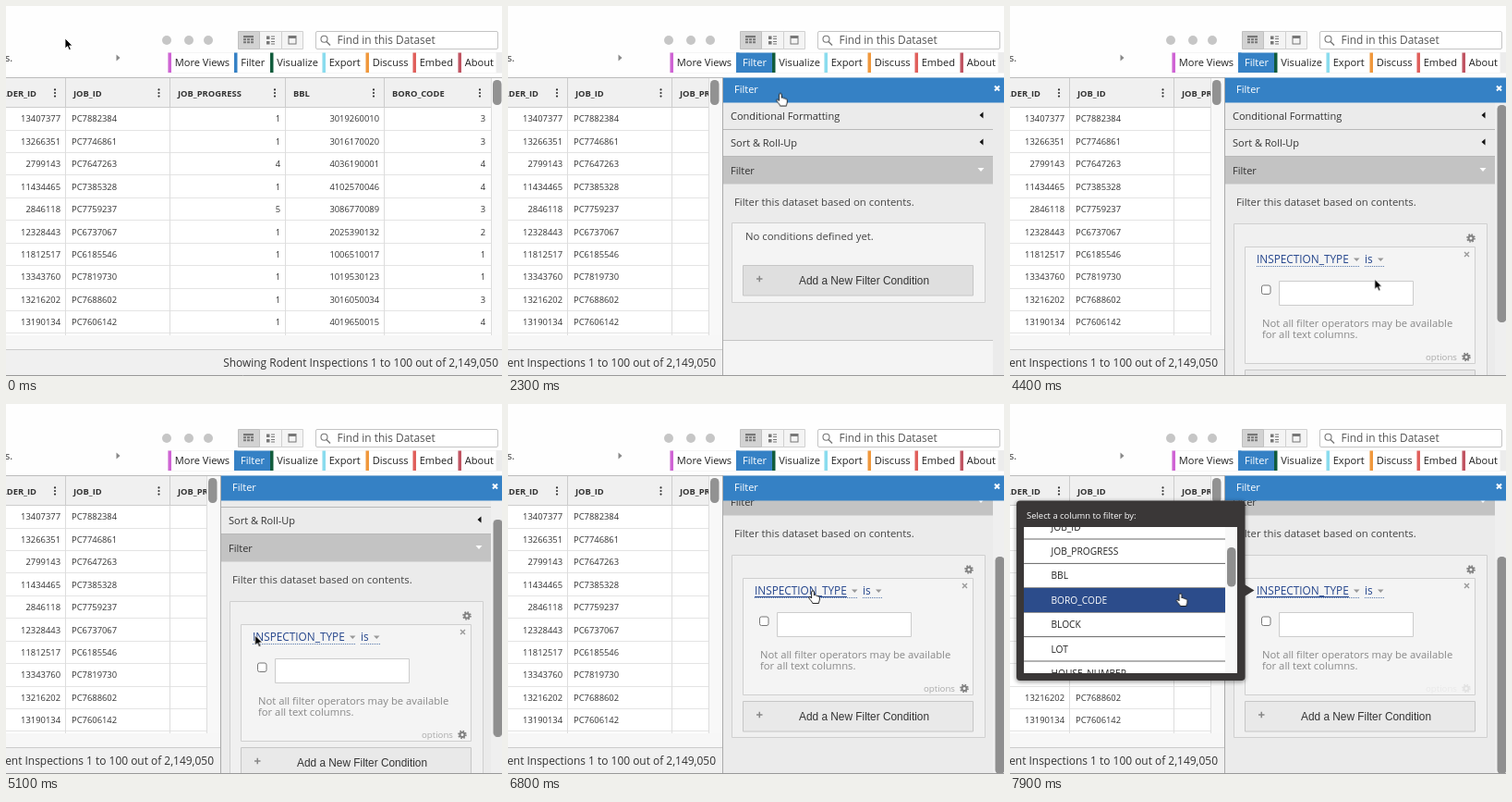
An HTML page for the animation above (8000 ms loop, 537 by 400 pixels).

```html
<!DOCTYPE html>
<html lang="en">
<head>
<meta charset="utf-8">
<title>Filtering a dataset</title>
<style>
html, body { margin: 0; width: 100%; height: 100%; overflow: hidden; background: #fff; }
svg { display: block; width: 537px; height: 400px; }
text { font: 11px "Open Sans", sans-serif; fill: #333; white-space: pre; }
.nav text { font-size: 11.1px; fill: #222; }
.cell { font-size: 9.4px; }
.head { font-size: 9.4px; font-weight: 700; }
.foot { font-size: 11.95px; }
.find { font-size: 11.9px; fill: #555; }
.note { font-size: 11.25px; fill: #888; }
.small { font-size: 9.66px; fill: #aaa; }
.body { font-size: 11.35px; fill: #444; }
.link { font-size: 11.8px; fill: #24458c; }
.btn { font: 11.86px "Liberation Sans", Arial, sans-serif; }
.item { font-size: 10.2px; fill: #222; }
.title { font-size: 9.44px; }
.end { text-anchor: end; }
text.white, .nav .white { fill: #fff; }

/* one percent of the loop is 80 ms */
.a { animation: 8s linear infinite; }
.hard { animation: 8s step-end infinite; }
#cursor { animation-name: move; }
#arrow { animation-name: arrow; }
#hand { animation-name: hand; }
#shift { animation-name: shift; }
#active { animation-name: active; }
#pane { animation-name: pane; }
#cover { animation-name: cover; }
#tip { animation-name: tip; }
.empty { animation-name: empty; }
.cond { animation-name: cond; }
#scroll { animation-name: scroll; }
#thumb { animation-name: thumb; }
#options { animation-name: options; }
#hover { animation-name: hover; }
#popup { animation-name: popup; }
#list { animation-name: list; }
#listThumb { animation-name: listThumb; }
#h3 { animation-name: h3; }
#h4 { animation-name: h4; }
#h5 { animation-name: h5; }

@keyframes move {
  0%, 1.25% { transform: translate(64px, 35px); }
  6.25% { transform: translate(400px, 57px); }
  8.75% { transform: translate(330px, 58px); }
  11.25%, 26.9% { transform: translate(268.5px, 60.5px); }
  31.25% { transform: translate(330px, 140px); }
  33.75% { transform: translate(383px, 280px); }
  35% { transform: translate(389px, 293px); }
  37.5%, 46.9% { transform: translate(390px, 295px); }
  50%, 55% { transform: translate(395px, 296px); }
  59.4% { transform: translate(320px, 66px); }
  63.75% { transform: translate(269px, 250px); }
  67.5%, 81.25% { transform: translate(436px, 239.5px); }
  85%, 87% { transform: translate(330px, 202px); }
  91.25% { transform: translate(199.5px, 206.5px); }
  93.75%, 100% { transform: translate(184.5px, 205px); }
}
@keyframes arrow { 0% { opacity: 1; } 4.75% { opacity: 0; } 47.5% { opacity: 1; } 83.75% { opacity: 0; } 87.5% { opacity: 1; } 93%, 100% { opacity: 0; } }
@keyframes hand { 0% { opacity: 0; } 4.75% { opacity: 1; } 47.5% { opacity: 0; } 83.75% { opacity: 1; } 87.5% { opacity: 0; } 93%, 100% { opacity: 1; } }
@keyframes active { 0% { opacity: 0; } 11.25%, 100% { opacity: 1; } }
@keyframes pane { 0% { opacity: 0; } 13.75%, 100% { opacity: 1; } }
@keyframes shift { 0% { transform: none; } 13.75%, 100% { transform: translateX(-308px); } }
@keyframes cover {
  0%, 17.6% { transform: none; animation-timing-function: ease-in-out; }
  23.6%, 47.49% { transform: translateY(169px); }
  47.5%, 100% { transform: translateY(281px); }
}
@keyframes tip { 0%, 30% { opacity: 0; } 32.5% { opacity: .4; } 35% { opacity: .1; } 36.25%, 100% { opacity: 0; } }
@keyframes empty { 0% { opacity: 1; } 47.5%, 100% { opacity: 0; } }
@keyframes cond { 0% { opacity: 0; } 47.5%, 100% { opacity: 1; } }
@keyframes scroll {
  0%, 57.5% { transform: none; }
  63.5%, 70% { transform: translateY(-22px); }
  74%, 100% { transform: translateY(-72px); }
}
@keyframes thumb {
  0%, 57.5% { transform: none; }
  63.5%, 70% { transform: translateY(17.7px); }
  74%, 100% { transform: translateY(58px); }
}
@keyframes options { 0%, 87.5% { opacity: 1; } 91.25% { opacity: .45; } 93.75%, 100% { opacity: .15; } }
@keyframes hover { 0% { opacity: 0; } 84%, 100% { opacity: 1; } }
@keyframes popup { 0%, 87.5% { opacity: 0; } 89.4%, 100% { opacity: 1; } }
@keyframes list { 0%, 95.5% { transform: none; } 98.5%, 100% { transform: translateY(-66px); } }
@keyframes listThumb { 0%, 95.5% { transform: none; } 98.5%, 100% { transform: translateY(19px); } }
@keyframes h3 { 0% { opacity: 1; } 97%, 100% { opacity: 0; } }
@keyframes h4 { 0% { opacity: 0; } 97% { opacity: 1; } 98.2%, 100% { opacity: 0; } }
@keyframes h5 { 0% { opacity: 0; } 98.2%, 100% { opacity: 1; } }
</style>
</head>
<body>
<svg viewBox="0 0 537 400">
  <defs>
    <g id="gear" fill="none" stroke="#808080">
      <circle r="2.5" stroke-width="2"/>
      <circle r="4" stroke-width="1.6" stroke-dasharray="1.6 1.54"/>
    </g>
    <g id="dots" fill="#333"><circle cy="-3.6" r="1.1"/><circle r="1.1"/><circle cy="3.6" r="1.1"/></g>
    <path id="x" d="M-2.5-2.5 2.5 2.5M2.5-2.5-2.5 2.5"/>
    <clipPath id="paneClip"><path d="M233 104H537V399H233Z"/></clipPath>
    <clipPath id="listClip"><path d="M15 133H246V291H15Z"/></clipPath>
    <filter id="soft"><feGaussianBlur stdDeviation="2"/></filter>
  </defs>

  <path fill="#fefefe" d="M0 0H537V77H0Z"/>

  <!-- top bar -->
  <text x="-1" y="60">s.</text>
  <path fill="#888" d="M119.5 52.5v7l4-3.5z"/>
  <g fill="#c6c6c6"><circle cx="174" cy="37" r="5"/><circle cx="198" cy="37" r="5"/><circle cx="219" cy="37" r="5"/></g>
  <g stroke="#d0d0d0">
    <path fill="#f4f4f4" d="M274.5 27.5h24v19h-24zM298.5 27.5h23v19h-23z"/>
    <path fill="#d2d2d2" stroke="#c0c0c0" d="M251.5 27.5h23v19h-23z"/>
    <rect x="335.5" y="27.5" width="197" height="19" rx="1.5" fill="#fff" stroke="#c4c4c4"/>
  </g>
  <g fill="#777">
    <path d="M257 32h11v2.2h-11zM257 35.3h3v2h-3zM261 35.3h3v2h-3zM265 35.3h3v2h-3zM257 38.3h3v2h-3zM261 38.3h3v2h-3zM265 38.3h3v2h-3z"/>
    <path d="M282 32.5h3.5v3.5h-3.5zM282 38h3.5v3.5h-3.5zM287 32.5h4v1h-4zM287 35h4v1h-4zM287 38h4v1h-4zM287 40.5h4v1h-4z"/>
    <path d="M305.5 32h9v9.5h-9zM306.5 35v5.5h7v-5.5z" fill-rule="evenodd"/>
  </g>
  <g fill="none" stroke="#777" stroke-width="1.1"><circle cx="344.5" cy="35.8" r="3.5"/><path d="M347 38.5l4 4" stroke-width="1.5"/></g>
  <text class="find" x="358.5" y="41">Find in this Dataset</text>
  <path fill="#ececec" d="M175 50H537V72.5H175Z"/>
  <g class="nav" id="nav"></g>
  <g id="active" class="nav hard">
    <path fill="#3581c5" d="M247 50.5h39v21.5h-39z"/>
    <text class="white" x="254" y="65">Filter</text>
  </g>

  <!-- table -->
  <path fill="#fff" d="M0 77H537V356H0Z"/>
  <path fill="#f0f0f0" d="M0 77H525V109H0Z"/>
  <path stroke="#bbb" d="M0 77.5H537"/>
  <path stroke="#ccc" d="M0 109.5H525"/>
  <g id="rows"></g>
  <path fill="#f7f7f7" d="M0 356H537V371H0Z"/>
  <path fill="#f0f0f0" d="M0 371H537V400H0Z"/>
  <path stroke="#ccc" d="M0 371.5H537"/>
  <g id="shift" class="hard">
    <path fill="#f8f8f8" d="M525 78h17v278h-17z"/>
    <path stroke="#ddd" d="M525.5 78V356"/>
    <rect x="527" y="80" width="9.5" height="27" rx="4.5" fill="#929292"/>
    <text class="foot end" x="533" y="389.5">Showing Rodent Inspections 1 to 100 out of 2,149,050</text>
  </g>
  <path stroke="#999" d="M0 399.5H537"/>

  <!-- hint bubble -->
  <g id="tip" class="a">
    <path fill="#fff" stroke="#999" d="M77 131h142v40l13 7-13 7v10H77z"/>
    <text class="cell" x="84" y="177">Filter this dataset based on</text>
    <text class="cell" x="84" y="187">contents.</text>
  </g>

  <!-- side pane -->
  <g id="pane" class="hard">
    <path fill="#ebebeb" d="M233 77H537V400H233Z"/>
    <g clip-path="url(#paneClip)">
      <g id="scroll" class="a">
        <path stroke="#b8b8b8" d="M233 133.5H525M233 162.5H525"/>
        <path fill="#c3c3c3" d="M233 163H525V192.5H233Z"/>
        <text x="241" y="123">Conditional Formatting</text>
        <text x="241" y="152">Sort &amp; Roll-Up</text>
        <text x="241" y="181.5">Filter</text>
        <path fill="#111" d="M514.5 114.5v7l-4-3.5zM514.5 143.5v7l-4-3.5z"/>
        <path fill="#fff" d="M508.5 175h7l-3.5 4z"/>
        <text class="body" x="245" y="215.6">Filter this dataset based on contents.</text>

        <g class="empty hard">
          <path fill="#f4f4f4" stroke="#cfcfcf" d="M242.5 234.5h274v86h-274z"/>
          <text class="body" x="257" y="252.8">No conditions defined yet.</text>
          <g class="add" fill="#dfdfdf"></g>
        </g>

        <g class="cond hard">
          <path fill="#f0f0f0" stroke="#cfcfcf" d="M242.5 235.5h274v197h-274z"/>
          <use href="#gear" x="499" y="251"/>
          <path fill="#f4f4f4" stroke="#cfcfcf" d="M254.5 260.5h249v126h-249z"/>
          <use href="#x" x="494.5" y="268.5" stroke="#999" stroke-width="1.4"/>
          <text class="link" x="267" y="277.7">INSPECTION_TYPE</text>
          <text class="link" x="384" y="277.7">is</text>
          <path stroke="#5577aa" stroke-dasharray="1 1" d="M267 281.5h112M384 281.5h21"/>
          <path id="hover" class="hard" stroke="#24458c" d="M267 280.5h100"/>
          <path fill="#999" d="M372 272.5h6.5l-3.25 3.5zM398 272.5h6.5l-3.25 3.5z"/>
          <rect x="272.5" y="302" width="9.5" height="9.5" rx="2" fill="#fff" stroke="#777"/>
          <path fill="#fff" stroke="#ccc" d="M291.5 297.5h145v26h-145z"/>
          <text class="note" x="273" y="346.8">Not all filter operators may be available</text>
          <text class="note" x="273" y="358.8">for all text columns.</text>
          <g id="options" class="a">
            <text class="small" x="450" y="383">options</text>
            <use href="#gear" x="494" y="379.5"/>
          </g>
          <g class="add" fill="#e9e9e9" transform="translate(0 113)"></g>
        </g>

        <g id="cover" class="a">
          <path fill="#f4f4f4" d="M233 192.5h292v220h-292z"/>
          <path stroke="#c4c4c4" d="M233 192.5h292"/>
        </g>
      </g>
      <g class="cond hard">
        <path fill="#efefef" d="M525 104h12v296h-12z"/>
        <rect id="thumb" class="a" x="527.5" y="107" width="10" height="235" rx="4.5" fill="#8f8f8f"/>
      </g>
    </g>
    <path fill="#3581c5" d="M233 77.5H537V104.5H233Z"/>
    <text class="white" x="245" y="94.3">Filter</text>
    <use href="#x" x="529.5" y="89" stroke="#fff" stroke-width="2"/>
    <path stroke="#aaa" d="M232.5 77V399"/>
    <path stroke="#999" d="M233 399.5H537"/>
  </g>

  <!-- column picker -->
  <g id="popup" class="a">
    <rect x="6" y="105" width="249" height="196" rx="5" fill="#000" opacity=".35" filter="url(#soft)"/>
    <path fill="#3a3737" d="M253 194.5l11.5 7-11.5 7z"/>
    <rect x="7" y="104.5" width="247.5" height="194.5" rx="4" fill="#3a3737"/>
    <text class="title white" x="18" y="123.5">Select a column to filter by:</text>
    <g clip-path="url(#listClip)">
      <path fill="#fff" d="M15 133h231v158h-231z"/>
      <g id="list" class="a">
        <path fill="none" stroke="#999" stroke-width="1.5" d="M26.5 146.5l2.5 2.5 5-6.5"/>
      </g>
      <path fill="#f8f8f8" d="M233 133h13v158h-13z"/>
      <rect id="listThumb" class="a" x="235" y="136" width="9.5" height="42.5" rx="4.5" fill="#8f8f8f"/>
    </g>
  </g>

  <g id="cursor" class="a">
    <path id="arrow" class="hard" fill="#000" stroke="#fff" stroke-width=".8" d="M0 0V11L2.6 8.6 4.4 12.6 6.3 11.8 4.6 7.9H8Z"/>
    <path id="hand" class="hard" fill="#fff" stroke="#111" stroke-width=".9" d="M-1.4 1C-1.4-.4 1.4-.4 1.4 1V5L1.8 4.6C2.7 4.2 3.6 4.6 3.8 5.4 4.7 4.9 5.6 5.4 5.7 6.1 6.6 5.8 7.4 6.3 7.4 7.2V9C7.4 10.8 6.6 11.4 6.4 13.5H-.2C-.5 11.8-2.8 10-4.1 8-4.8 6.7-3.2 5.8-2.3 6.9L-1.4 8Z"/>
  </g>
</svg>
<script>
const $ = s => document.querySelector(s);
const text = (cls, x, y, s) => `<text class="${cls}" x="${x}" y="${y}">${s}</text>`;

// toolbar: label, left edge, accent
const tabs = [
  ["More Views", 175.5, "#cf63d4"], ["Filter", 247, "#3581c5"], ["Visualize", 286, "#115c3c"],
  ["Export", 342.5, "#8adcee"], ["Discuss", 389.5, "#f0983c"], ["Embed", 440.5, "#e0605c"],
  ["About", 489.5, "#c05462"], ["", 530.5]
];
$("#nav").innerHTML = tabs.slice(0, -1).map(([label, x, color], i) =>
  `<path fill="#fff" d="M${x} 50.5H${tabs[i + 1][1]}V72H${x}Z"/>
   <path fill="${color}" d="M${x} 50.5h3.5v21.5h-3.5z"/>` + text("", x + 7.2, 65, label)).join("");

// table
const rows = `13407377 PC7882384 1 3019260010 3
13266351 PC7746861 1 3016170020 3
2799143 PC7647263 4 4036190001 4
11434465 PC7385328 1 4102570046 4
2846118 PC7759237 5 3086770089 3
12328443 PC6737067 1 2025390132 2
11812517 PC6185546 1 1006510017 1
13343760 PC7819730 1 1019530123 1
13216202 PC7688602 1 3016050034 3
13190134 PC7606142 1 4019650015 4`.split("\n").map(r => r.split(" "));
const pitch = 24.43, edges = [59, 71, 297, 404, 519];
let out = text("head end", 33, 97.5, "ORDER_ID");
[["JOB_ID", 73], ["JOB_PROGRESS", 186], ["BBL", 311], ["BORO_CODE", 418]]
  .forEach(([s, x]) => out += text("head", x, 97.5, s));
[53, 165.5, 291, 398, 513].forEach(x => out += `<use href="#dots" x="${x}" y="94"/>`);
rows.forEach((r, i) => {
  const y = 125.4 + i * pitch;
  r.forEach((s, c) => out += text(c == 1 ? "cell" : "cell end", edges[c], y, s));
  out += `<path stroke="#e4e4e4" d="M0 ${Math.floor(y + 8.7) + .5}H525"/>`;
});
[64.5, 177.5, 302.5, 409.5].forEach(x =>
  out += `<path stroke="#ccc" d="M${x} 78V109"/><path stroke="#ddd" d="M${x} 110V356"/>`);
$("#rows").innerHTML = out;

document.querySelectorAll(".add").forEach(g => g.innerHTML =
  `<path stroke="#c6c6c6" d="M254.5 280.5h249v32.5h-249z"/>
   <path stroke="#888" stroke-width="1.5" d="M269 295h6.5M272.25 291.75v6.5"/>` +
  text("btn", 315, 301, "Add a New Filter Condition"));

// column list, some rows with a highlighted twin
const columns = ["INSPECTION_TYPE", "JOB_TICKET_OR_WORK_ORDER_ID", "JOB_ID", "JOB_PROGRESS",
  "BBL", "BORO_CODE", "BLOCK", "LOT", "HOUSE_NUMBER"];
$("#list").innerHTML += columns.map((s, i) => {
  const y = 146 + i * 26.4, label = cls => text(cls, 44.5, y + 3.7, s);
  const lit = i > 2 && i < 6
    ? `<g id="h${i}" class="hard"><path fill="#2c4c8b" d="M15 ${y - 13}h218v26h-218z"/>${label("item white")}</g>` : "";
  return label("item") + `<path stroke="#666" d="M15 ${y + 13.2}h218"/>` + lit;
}).join("");
</script>
</body>
</html>
```
